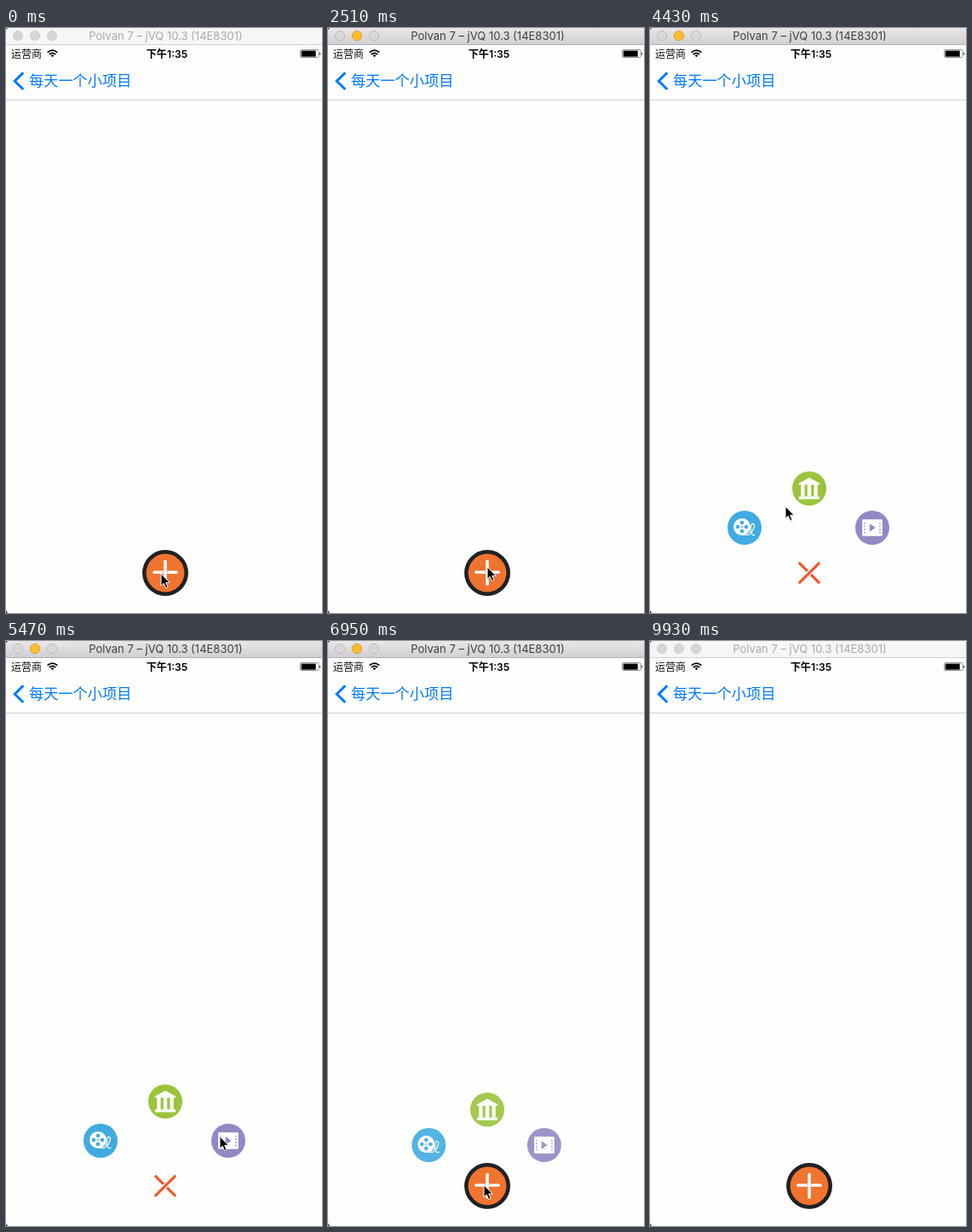
An HTML page for the animation above (9990 ms loop, 371 by 686 pixels).

```html
<!DOCTYPE html>
<html lang="zh-CN">
<head>
<meta charset="utf-8">
<title>Menu</title>
<style>
html, body { margin: 0; width: 100%; height: 100%; overflow: hidden; background: #fefefe; }
svg { display: block; width: 371px; height: 686px; }
text { font-family: Inter, "Noto Sans CJK SC", "Noto Sans CJK", sans-serif; }
</style>
</head>
<body>
<svg viewBox="0 0 371 686">
  <defs>
    <linearGradient id="bar" x2="0" y2="1">
      <stop stop-color="#e9e7e9"/><stop offset="1" stop-color="#d1cfd1"/>
    </linearGradient>
  </defs>
  <rect width="371" height="686" fill="#fefefe"/>

  <rect id="head" width="371" height="19"/>
  <rect id="edge" y="19" width="371" height="1"/>
  <g id="lights" stroke-width="1">
    <circle cx="14" cy="9" r="5.6"/><circle cx="34" cy="9" r="5.6"/><circle cx="54" cy="9" r="5.6"/>
  </g>
  <text id="title" x="187.5" y="14" font-size="13" text-anchor="middle">Polvan 7 – jVQ 10.3 (14E8301)</text>
  <path d="M0 0H2L0 2ZM0 686V682.5Q.6 685 2.5 686Z" fill="#222"/>

  <text x="6" y="34.5" font-size="12" fill="#111">运营商</text>
  <g fill="none" stroke="#000" stroke-width="1.7">
    <path d="M48.7 28.6Q54.5 23.6 60.3 28.6M50.8 31Q54.5 27.8 58.2 31"/>
    <path d="M54.5 34.2L52.6 32.1Q54.5 30.6 56.4 32.1Z" fill="#000" stroke="none"/>
  </g>
  <text x="189" y="34.5" font-size="12.2" font-weight="600" text-anchor="middle">下午1:35</text>
  <rect x="345.5" y="25.5" width="21.5" height="9" rx="1.3" fill="none" stroke="#777" stroke-width=".8"/>
  <rect x="346.7" y="26.6" width="17" height="7" fill="#000"/>
  <path d="M368 28.5Q370 30 368 32Z" fill="#000"/>

  <path d="M20.3 52.4L10.3 62.2L20.3 72" fill="none" stroke="#007aff" stroke-width="3"/>
  <text x="27" y="68" font-size="17.2" fill="#007aff">每天一个小项目</text>
  <rect y="84" width="371" height="1" fill="#cfcfd0"/>

  <g id="film" fill="#fff">
    <circle r="20" fill="#41abe1"/>
    <circle cx="-3" cy="-1" r="10"/>
    <g fill="#41abe1">
      <circle cx="-3" cy="-6" r="2.3"/><circle cx="-3" cy="4" r="2.3"/>
      <circle cx="-8" cy="-1" r="2.3"/><circle cx="2" cy="-1" r="2.3"/><circle cx="-3" cy="-1" r=".9"/>
    </g>
    <path d="M-3 8.3H4C10 8 5-4 9.5-4.6C14-4 10 2 8.5 5C7.5 8 9.5 9.5 12.5 8" fill="none" stroke="#fff" stroke-width="1.2"/>
  </g>
  <g id="bank" fill="#fff">
    <circle r="20" fill="#9ac43c"/>
    <path d="M-12.3-6L0-12.8L12.3-6V-4.5H-12.3ZM-9.8-4.5h4.3V9h-4.3ZM-2.2-4.5h4.4V9h-4.4ZM5.5-4.5h4.3V9h-4.3ZM-12 9.2H12V12.5H-12Z"/>
  </g>
  <g id="clip" fill="#fff">
    <circle r="20" fill="#9289c4"/>
    <rect x="-11.8" y="-9.8" width="23.6" height="19.6" rx="1.2"/>
    <path d="M-3.2-4.8L3.6 0L-3.2 4.8Z" fill="#9289c4"/>
    <path d="M-9-5.8V6.5M9-5.8V6.5" stroke="#9289c4" stroke-width="1.5" stroke-dasharray="1.5 2"/>
  </g>

  <g id="plus" transform="translate(187 639)" stroke-linecap="round">
    <circle r="27" fill="#202124"/><circle r="22.4" fill="#f07430"/>
    <path d="M-13-.8H13" stroke="#fff" stroke-width="3.6"/>
    <path d="M0-5V4" stroke="#f07430" stroke-width="4.6" stroke-linecap="butt"/>
    <path d="M0-13.4V13.2" stroke="#fff" stroke-width="3.6"/>
  </g>
  <g id="cross" transform="translate(187 639)" stroke="#ee5a2c" stroke-width="3.2" stroke-linecap="round">
    <path d="M-11.2-11.2L11.2 11.2"/>
    <path d="M-4 4L4-4" stroke="#fefefe" stroke-width="6" stroke-linecap="butt"/>
    <path d="M11.2-11.2L-11.2 11.2"/>
  </g>

  <g id="cursor">
    <path d="M0 0V14.2L3.2 11.3L5.6 16.7L8 15.7L5.7 10.4H10.2Z" transform="translate(.6 1.2)" fill="#000" opacity=".18"/>
    <path d="M0 0V14.2L3.2 11.3L5.6 16.7L8 15.7L5.7 10.4H10.2Z" fill="#000" stroke="#fff" stroke-width="1" stroke-linejoin="round"/>
  </g>
</svg>
<script>
const LOOP = 9990, STEP = 147.77;
const OPEN = 2745, CLOSE = 6880, SLIDE = 340;
const HUB = [187, 639];
const $ = id => document.getElementById(id);
const set = (el, attrs) => { for (const k in attrs) el.setAttribute(k, attrs[k]); };
const show = (el, on) => { el.style.display = on ? "" : "none"; };
const mix = (a, b, p) => a + (b - a) * p;
const ease = x => { x = Math.min(1, Math.max(0, x)); return x * x * (3 - 2 * x); };

// home position and the step during which each icon is pressed
const icons = [
  { el: $("film"), x: 111, y: 586, press: 28 },
  { el: $("bank"), x: 187, y: 540, press: 32 },
  { el: $("clip"), x: 261, y: 586, press: 40 }
];
for (const icon of icons) {
  icon.shade = document.createElementNS("http://www.w3.org/2000/svg", "circle");
  set(icon.shade, { r: 20, fill: "#000", opacity: 0.35 });
  icon.el.append(icon.shade);
}

// pointer path: step, x, y
const path = [
  [0, 182, 640], [1, 182, 640], [5, 144, 457], [7, 144, 457], [9, 206, 557], [11, 206, 557],
  [12, 207, 557], [14, 207, 557], [17, 187, 632], [18, 187, 643], [23, 187, 643],
  [24, 171, 621], [27, 104, 587], [28, 104, 587], [31, 186, 548], [33, 186, 548],
  [37, 251, 581], [41, 251, 581], [45, 183, 638], [50, 183, 638], [52, 296, 671],
  [53, 296, 671], [54, 301, 673], [55, 301, 673]
];

function pointer(k) {
  const i = Math.max(1, path.findIndex(p => p[0] >= k));
  const a = path[i - 1], b = path[i], p = (k - a[0]) / (b[0] - a[0]);
  return [mix(a[1], b[1], p), mix(a[2], b[2], p)].map(Math.round);
}

function drawWindow(active) {
  set($("head"), { fill: active ? "url(#bar)" : "#f6f6f6" });
  set($("edge"), { fill: active ? "#b1afb1" : "#d2d2d2" });
  set($("title"), { fill: active ? "#3f3f3f" : "#aaaaaa" });
  [...$("lights").children].forEach((dot, i) => {
    const amber = active && i === 1;
    set(dot, {
      fill: amber ? "#fdbd2f" : active ? "#d9d8d9" : "#d6d6d6",
      stroke: amber ? "#dd9f26" : active ? "#bebcbe" : "#d0d0d0"
    });
  });
}

function draw(t) {
  const k = Math.floor((t + 10) / STEP), now = k * STEP;
  drawWindow(t >= 150 && t < 9930);

  const open = now >= OPEN && now < CLOSE;
  const out = ease((now - OPEN) / SLIDE) - ease((now - CLOSE) / SLIDE);
  for (const { el, x, y, press, shade } of icons) {
    set(el, {
      transform: `translate(${mix(HUB[0], x, out)} ${mix(HUB[1], y, out)})`,
      opacity: out
    });
    show(shade, k === press);
  }
  show($("plus"), !open);
  show($("cross"), open);

  show($("cursor"), k < 55);
  if (k < 55) set($("cursor"), { transform: `translate(${pointer(k)})` });
}

const start = performance.now();
function loop() {
  draw((performance.now() - start) % LOOP);
  requestAnimationFrame(loop);
}
loop();
</script>
</body>
</html>
```
